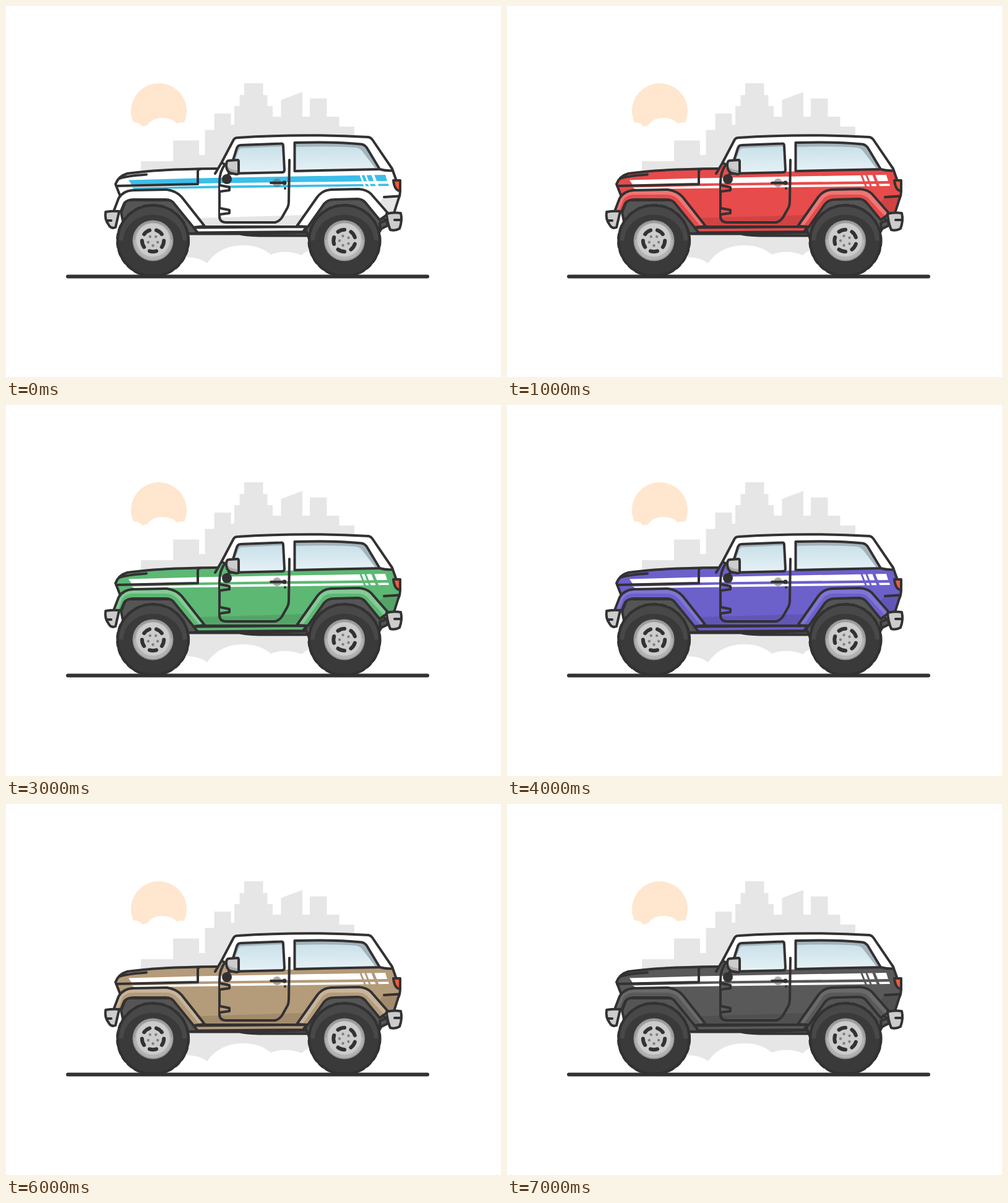
These frames come from a looping animation (800x600 px, 8000 ms). An HTML page:

```html
<!DOCTYPE html>
<html lang="en">
<head>
<meta charset="utf-8">
<title>Off-roader paint colours</title>
<style>
  html, body { margin: 0; width: 100%; height: 100%; overflow: hidden; background: #fff; }
  svg { display: block; width: 100%; height: 100%; }
  .ink { stroke: #333132; stroke-width: 4; stroke-linecap: round; stroke-linejoin: round; }
  .line { fill: none; }
  .paint { fill: var(--paint); }
  .stripe { fill: var(--stripe); }
  .glint { fill: #fff; opacity: var(--glint); }
  .shade { fill: #000; opacity: .1; }
  .gap { fill: none; stroke: var(--paint); }
</style>
</head>
<body>
<svg id="stage" viewBox="0 0 800 600">
  <defs>
    <linearGradient id="glass" x2="0" y2="1">
      <stop offset=".1" stop-color="#cce2ea"/>
      <stop offset="1" stop-color="#e6f2f6"/>
    </linearGradient>
    <clipPath id="tyreClip"><circle r="56"/></clipPath>
    <clipPath id="rimClip"><circle r="31"/></clipPath>
    <g id="tyre">
      <circle r="57" fill="#3a3a3a" class="ink" stroke-width="4"/>
      <circle r="57.6" fill="none" stroke="#333132" stroke-width="4" stroke-dasharray="9 5.1"/>
      <g clip-path="url(#tyreClip)">
        <path d="M-60-60H60V0H48A48 42 0 0 0-48 0H-60Z" fill="#484848"/>
        <path d="M-60 60V0H-48A48 47 0 0 0 48 0H60V60Z" fill="#3a3a3a"/>
      </g>
      <circle r="57" class="ink line"/>
      <circle r="33" fill="#999"/>
      <g clip-path="url(#rimClip)">
        <circle r="33" fill="#b3b3b3"/>
        <path d="M-34-34H34V-2H29A29 27 0 0 0-29-2H-34Z" fill="#999"/>
        <circle cy="-1" r="27" fill="#ccc"/>
      </g>
    </g>
  </defs>

  <circle cx="247" cy="170" r="45" fill="#ffe6ce"/>
  <path fill="#fff" d="M200 190Q214 185 220 195Q225 193 228 193Q236 181 252 181Q269 181 276 190Q282 187 290 189H296V220H200Z"/>
  <path fill="#e6e6e6" d="M218 380V251H270V217.5H312V241H321.5V200.500H336.500V174H363.500V192H369V162H377.500V144H385V125H415.500V144H422.500V162H431V179H444.500V152L479 139V179H491V149.500H518.500V179H538.500V195H563V380H492V394Q484 397 478 403Q452 393 428 402Q410 387 384 387Q345 387 325 416Q312 406 290 406V380Z"/>

  <!-- chassis and wheel wells -->
  <path fill="#555" class="ink" d="M380 369Q398 372 430 371.500H492L490 366H380Z"/>
  <path fill="#555" class="ink" d="M186 334L194 314H268L306 357L308 368H280V400H200Z"/>
  <path fill="#555" class="ink" d="M484 362L514 312H574L614 346L606 361L590 390H496Z"/>

  <!-- body shell -->
  <path fill="#fff" d="M340 272L368 216Q370 213 374 213Q480 206 586 212Q590 213 592 216L625 267L460 290H345Z"/>
  <path class="paint" d="M177 288Q182 275 196 271Q240 264 340 263L350 253L359 271L465 267.500L605 264.500L625 266L637 300V306L627 335L612 340L575 300H520L484 358L480 365H309L300 354L270 306H200L177 330L184 307Z"/>
  <path class="shade" d="M311 343L481 338L470 357H321Z M610 310L634 309L627 335L618 335L603 318Z"/>

  <!-- stripes -->
  <g class="stripe">
    <path d="M198 281.500L310 278.500L613 273L616 283L345 286.500L203 289Z"/>
    <path d="M203 293.500L345 290.500L618 287.500L619 291L345 294.500L208 296.500Z"/>
  </g>
  <path class="gap" stroke-width="3" d="M572 271L581 294M580 271L589 294"/>
  <path class="gap" stroke-width="4.500" d="M592 271L601 294"/>

  <!-- glass -->
  <g id="windows">
    <path fill="#a3b3bb" d="M379 225L444 222.500Q448 222 448 226L450 265Q450 269 446 269L360 271L373 230Q375 225 379 225Z"/>
    <path fill="url(#glass)" d="M381 230L448 227L449 269L362 271L376 233Q378 230 381 230Z"/>
    <path class="ink line" d="M379 225L444 222.500Q448 222 448 226L450 265Q450 269 446 269L360 271L373 230Q375 225 379 225Z"/>
    <path fill="#a3b3bb" d="M466.500 221Q530 219 574 223.500Q579 224 583 229L604 264L466.500 267Z"/>
    <path fill="url(#glass)" d="M468 228Q530 226 565 229Q572 230 575 234L598 264L468 267Z"/>
    <path class="ink line" d="M466.500 221Q530 219 574 223.500Q579 224 583 229L604 264L466.500 267Z"/>
  </g>

  <!-- body lines -->
  <g class="ink line">
    <path d="M184 306L177 288Q182 275 196 271Q240 264 341 263"/>
    <path d="M178 291L310 288V268Q310 264 313 264M183 279Q194 275 227 272.500"/>
    <path d="M338 271L348 254L368 216Q370 213 374 213Q480 206 586 212Q590 213 592 216L624 263L637 300Q637 307 634 313L627 335"/>
    <path d="M604 264Q614 267 625 266M611 309L635 307.500"/>
    <path d="M349 254L354 256Q345 268 345 285V340Q345 350 356 350H435Q442 348 446 342L455 326Q457 322 457 316L458 249"/>
  </g>
  <path class="ink paint" d="M346 290L361 293V298L346 300M346 327L361 330V335L346 337"/>

  <!-- sill -->
  <path class="ink paint" d="M303 358.500L486 357L480 365L310 366.500Z"/>
  <path class="ink line" d="M297 368.500H400L482 366M320 357H470"/>

  <!-- fenders -->
  <path class="paint" d="M174 332L182 311Q189 299 205 298L260 297Q275 299 284 309L321 356L303 358L273 321Q268 313 258 313H206Q196 313 191 319L186 331Z"/>
  <path class="glint" d="M176 330L184 311Q190 300 205 299L260 298Q275 300 283 309L319 355H312L278 314Q270 305 258 305H206Q194 305 188 313L181 331Z"/>
  <path class="ink line" d="M174 332L182 311Q189 299 205 298L260 297Q275 299 284 309L321 356L303 358L273 321Q268 313 258 313H206Q196 313 191 319L186 331"/>
  <path class="paint" d="M470 356L503 309Q511 298 525 297L570 296Q583 297 590 304L618 336L604 346L581 318Q576 312 568 312L530 313Q520 313 514 320L488 357Z"/>
  <path class="glint" d="M472 355L505 309Q512 299 525 298L570 297Q582 298 589 305L615 335L610 339L584 311Q578 305 569 305H527Q516 305 510 313L480 355Z"/>
  <path class="ink line" d="M470 356L503 309Q511 298 525 297L570 296Q583 297 590 304L618 336L604 346L581 318Q576 312 568 312L530 313Q520 313 514 320L488 357Z"/>

  <!-- bumpers, light, mirror, handle -->
  <path fill="#555" class="ink" d="M604 351L616 346L617 355L605 361Z"/>
  <path fill="#ccc" class="ink" d="M615 336Q626 333 638 335Q641 347 636 360Q629 364 621 362Q616 350 615 336Z"/>
  <path fill="#ccc" class="ink" d="M161 333Q172 331 183 332L177 358Q170 361 166 354Q159 345 161 333Z"/>
  <path class="ink line" d="M628 346H638M163 347H170"/>
  <path fill="#f15a3a" class="ink" stroke-width="3" d="M626 282H637V299Q628 299 626 282Z"/>
  <path fill="#ccc" d="M360 250L374 249Q376 249 376 252V270Q376 272 372 272L362 270Q356 266 356 258Q356 250 360 250Z"/>
  <path fill="#aaa" d="M357 257Q360 265 375 266V272L362 270Q357 266 357 257Z"/>
  <path class="ink line" d="M360 250L374 249Q376 249 376 252V270Q376 272 372 272L362 270Q356 266 356 258Q356 250 360 250Z"/>
  <circle cx="357" cy="280" r="8" fill="#333132"/>
  <path class="ink line" stroke-width="7" d="M360 271L358 279"/>
  <circle cx="438" cy="286" r="7" fill="#666" opacity=".55"/>
  <path class="ink line" d="M428 286H451"/>
  <circle cx="450" cy="286" r="3.500" fill="#333132"/>
  <circle cx="451" cy="295" r="2" fill="#333132"/>

  <g id="wheels"></g>
  <path class="ink line" style="stroke-width:6" d="M100 437.500H681"/>
</svg>
<script>
const PAINT_TIME = 1000;
const WHITE = '#ffffff';
// paint, stripe, fender highlight strength
const schemes = [
  [WHITE, '#3cbee9', 0],
  ['#e74b4b', WHITE, .24],
  ['#3cbee9', WHITE, .3],
  ['#5cb873', WHITE, .25],
  ['#6c60cb', WHITE, .13],
  ['#f5b83d', WHITE, .28],
  ['#b49b79', WHITE, .25],
  ['#595959', WHITE, .1]
];

function wheel(x, turn) {
  let parts = '<use href="#tyre"/>';
  for (let i = 0; i < 5; i++) {
    parts += `<g transform="rotate(${turn + i * 72})">
      <path d="M16.800-5.500A17.700 17.700 0 0 1 16.800 5.500" class="ink line" style="stroke-width:6"/>
      <circle cx="8" r="2.200" fill="#808080"/></g>`;
  }
  return `<g transform="translate(${x} 379.500)">${parts}</g>`;
}
document.getElementById('wheels').innerHTML = wheel(237.500, 18) + wheel(547, 36);

const { style } = document.getElementById('stage');
const start = performance.now();
function draw(now) {
  const step = Math.floor(Math.max(0, now - start) / PAINT_TIME) % schemes.length;
  const [paint, stripe, glint] = schemes[step];
  style.setProperty('--paint', paint);
  style.setProperty('--stripe', stripe);
  style.setProperty('--glint', glint);
  requestAnimationFrame(draw);
}
draw(start);
</script>
</body>
</html>
```
